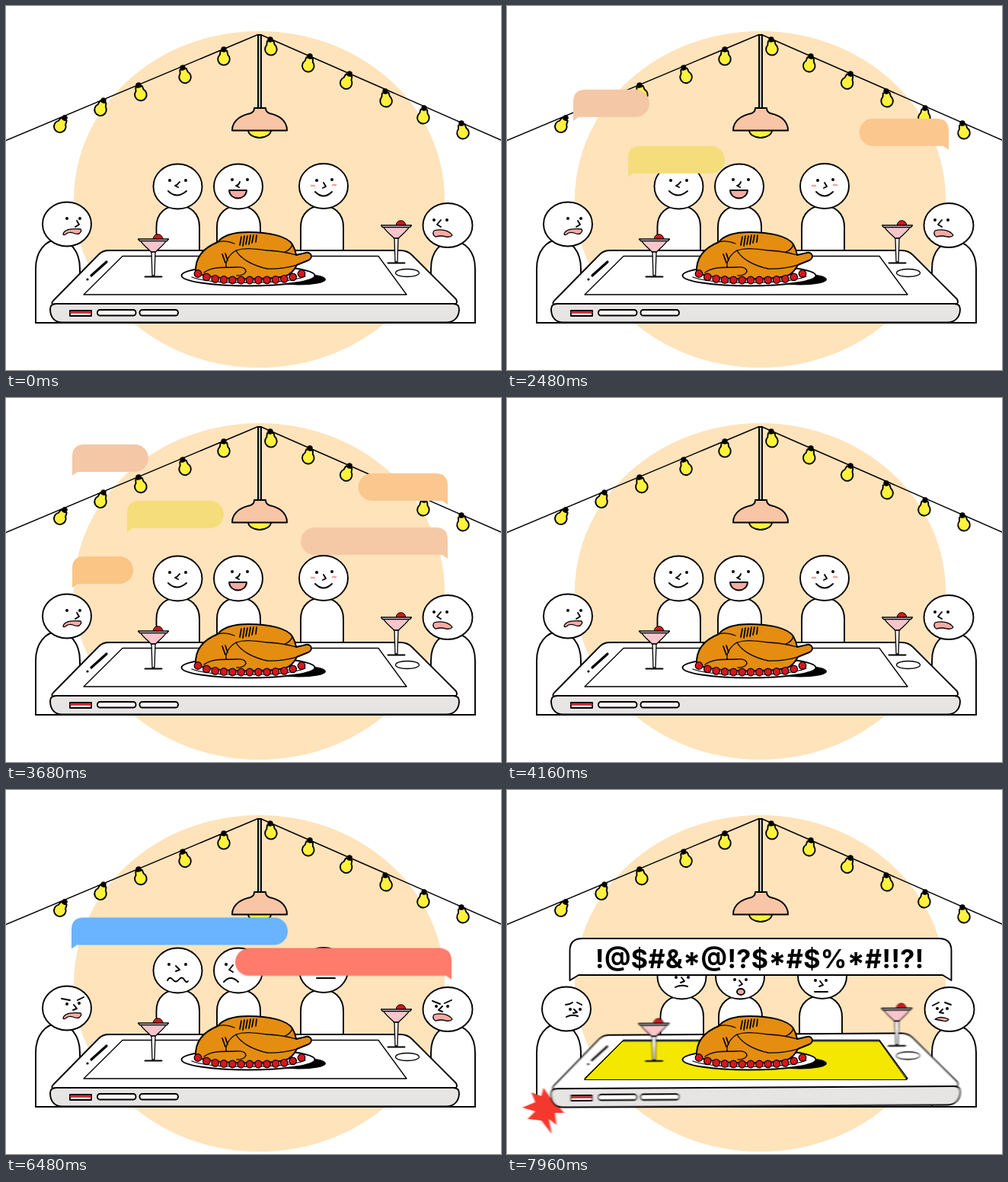
Animation of 650x478 px, one loop 8000 ms. Source, as an HTML page:

```html
<!DOCTYPE html>
<html lang="en">
<head>
<meta charset="utf-8">
<title>Dinner on a phone</title>
<style>
html, body { margin: 0; width: 100%; height: 100%; overflow: hidden; background: #fff; }
svg { display: block; width: 100vw; height: 100vh; }
.ink { stroke: #000; stroke-width: 1.9; stroke-linejoin: round; stroke-linecap: round; fill: none; }
.w { fill: #fff; }
.pink { fill: #f8aaa4; }
.eyes { stroke-width: 4; }
.thin { stroke-width: 1.3; }

/* 1% of the loop is 80 ms */
.s, .chat, .row, .quarrel, .shout, .jolt, .slam, .soft, .burst, .type {
  animation: 8s linear infinite;
}
.s, .jolt, .slam, .soft, .burst, .type { animation-timing-function: step-end; }
.a { animation-name: calm; }
.b { animation-name: stare; }
.bc { animation-name: glare; }
.cd { animation-name: worry; }
.bd { animation-name: anger; }
.d { animation-name: argue; }
.e { animation-name: shock; }
.flash { animation-name: flash; }
@keyframes calm { 0% { opacity: 1 } 57.5%, 100% { opacity: 0 } }
@keyframes stare { 0% { opacity: 0 } 57.5% { opacity: 1 } 67.5%, 100% { opacity: 0 } }
@keyframes glare { 0% { opacity: 0 } 57.5% { opacity: 1 } 81%, 100% { opacity: 0 } }
@keyframes worry { 0% { opacity: 0 } 67.5% { opacity: 1 } 97%, 100% { opacity: 0 } }
@keyframes anger { 0% { opacity: 0 } 57.5% { opacity: 1 } 97%, 100% { opacity: 0 } }
@keyframes argue { 0% { opacity: 0 } 81% { opacity: 1 } 97%, 100% { opacity: 0 } }
@keyframes shock { 0% { opacity: 0 } 97%, 100% { opacity: 1 } }
@keyframes flash { 0% { opacity: 0 } 98%, 100% { opacity: 1 } }

.chat { animation-name: chat, chatOut; }
.quarrel { animation-name: quarrel, quarrelOut; }
.chat, .quarrel { animation-timing-function: ease-in-out, linear; }
@keyframes chat {
  0%, 14.25% { transform: translateY(0) }
  18%, 21.25% { transform: translateY(-39px) }
  25%, 28.75% { transform: translateY(-74px) }
  32.5%, 36.25% { transform: translateY(-110px) }
  40%, 46% { transform: translateY(-147px) }
  52%, 100% { transform: translateY(-206px) }
}
@keyframes chatOut { 0%, 46.5% { opacity: 1 } 52%, 100% { opacity: 0 } }
@keyframes quarrel {
  0%, 63.3% { transform: translateY(0) }
  67.05%, 100% { transform: translateY(-40.5px) }
}
@keyframes quarrelOut { 0%, 50% { opacity: 0 } 50.1%, 85% { opacity: 1 } 87%, 100% { opacity: 0 } }
.row { animation-name: row; }
@keyframes row {
  0% { opacity: 0; transform: translateY(5px) }
  1.75%, 45% { opacity: 1; transform: translateY(0) }
  45.1%, 100% { opacity: 0; transform: translateY(5px) }
}
.shout { animation-name: shout; }
@keyframes shout { 0%, 88.5% { opacity: 0 } 90.5%, 100% { opacity: 1 } }
.type { animation-name: type; }
@keyframes type { 0% { fill: #000 } 9%, 100% { fill: transparent } }

.jolt { animation-name: jolt; }
@keyframes jolt {
  0% { transform: none }
  97% { transform: translate(0, -2px) }
  97.5% { transform: translate(0, -4px) }
  98% { transform: translate(calc(var(--x) * -.5), 3px) }
  98.5% { transform: translate(var(--x), var(--y)) }
  99% { transform: translate(calc(var(--x) * .4), 4px) }
  99.5%, 100% { transform: translate(var(--x), var(--y)) }
}
.slam { animation-name: slam; transform-origin: 590px 415px; }
@keyframes slam {
  0% { transform: none }
  97% { transform: rotate(.4deg) }
  97.5% { transform: rotate(.8deg) }
  98% { transform: rotate(-.3deg) }
  98.5% { transform: translate(2px, -2px) }
  99% { transform: translate(-1px, 2px) }
  99.5%, 100% { transform: translate(0, -2px) rotate(-.35deg) }
}
.soft { animation-name: soft; }
@keyframes soft { 0% { filter: none } 97.5%, 100% { filter: url(#smear) } }
.burst { animation-name: burst; transform-origin: 60px 408px; }
@keyframes burst {
  0% { opacity: 0; transform: scale(.5) }
  98% { opacity: 1; transform: scale(.6) }
  98.5% { opacity: 1; transform: scale(.85) }
  99% { opacity: 1; transform: scale(.95) }
  99.5%, 100% { opacity: 1; transform: none }
}
text { font: 700 34px Inter, "Open Sans", sans-serif; font-feature-settings: "case"; letter-spacing: .4px; }
</style>
</head>
<body>
<svg viewBox="0 0 650 478" preserveAspectRatio="none">
<defs>
  <filter id="smear" x="-5%" y="-10%" width="110%" height="120%"><feGaussianBlur stdDeviation="1.3 .7"/></filter>
  <g id="bulb">
    <path class="ink" style="fill:#fff23c" d="M-4.300 2L-5.200 7A7.800 7.800 0 1 0 5.200 7L4.300 2Z"/>
    <circle r="3.700"/>
  </g>
  <g id="glass">
    <circle class="ink" style="fill:#d8141c;stroke-width:1" cx="6" cy="0" r="6.300"/>
    <path class="ink thin" style="fill:#f9c5cc" d="M-17 2C-13 9 -6 13 -3 17H3C6 13 13 9 17 2Z"/>
    <path class="ink w thin" d="M-20 0H20L18 2.500H-18ZM-2.500 17L-1.500 48H1.500L2.500 17Z"/>
    <path class="ink" d="M-11 49.500H11"/>
  </g>
</defs>

<ellipse cx="332.500" cy="254" rx="243.500" ry="221" fill="#ffe3bb"/>

<g class="ink">
  <path style="stroke-width:1.500" d="M0 176.500 331 37.500M334 37.500 650 176"/>
  <path style="fill:#bbb" d="M331 38H335V135H331Z"/>
  <path style="fill:#fff23c" d="M318 163A15 10 0 0 0 348 163Z"/>
  <path style="fill:#f8c5a5" d="M297 163.500C297 149 311 143 321 141Q326 139 326 134H341Q341 139 346 141C356 143 369 149 369 163.500Z"/>
</g>
<g id="bulbs"></g>

<g class="ink">
  <g class="jolt" style="--x:4px;--y:8px">
    <path class="w" d="M197.500 335V290C197.500 272 210 262 226 262S254 272 254 290V335"/>
    <ellipse class="w" cx="225.500" cy="237" rx="32" ry="29.500"/>
    <g class="s a"><path class="eyes" d="M215 229h.01M236 229h.01"/><path d="M228 231Q225 235 222 236L226 238M213 243Q224 254 237 243"/></g>
    <g class="s b"><path class="eyes" d="M208 230h.01M227 230h.01"/><path d="M215 230 211 236 215 238M204 247Q207 242 210 246T217 247T224 247T229 249"/></g>
    <g class="s cd"><path class="eyes" d="M214 229h.01M236 229h.01"/><path d="M223 231 228 236 223 238M212 250Q215 244 219 249T227 249T234 249T239 251"/></g>
    <g class="s e"><path class="eyes" d="M218 238h.01M234 238h.01"/><path d="M225 238 229 243 224 245M217 251Q225 247 233 250"/></g>
  </g>
  <g class="jolt" style="--x:1px;--y:8px">
    <path class="w" d="M277 335V290C277 272 290 262 305.500 262S334 272 334 290V335"/>
    <ellipse class="w" cx="305" cy="237" rx="32" ry="29.500"/>
    <g class="s a"><path class="eyes" d="M297 228h.01M317 228h.01"/><path d="M307 231Q306 235 302 236L306 238"/><path class="pink" d="M293 242H316C315 256 294 256 293 242Z"/></g>
    <g class="s bd"><path class="eyes" d="M289 229h.01M307 229h.01"/><path d="M298 230 293 236 298 239M286 252Q295 242 305 252"/></g>
    <g class="s e"><path class="eyes" d="M298 241h.01M313 241h.01"/><path d="M304 242 308 247 304 249"/><ellipse class="pink" cx="306" cy="257" rx="5" ry="4"/></g>
  </g>
  <g class="jolt" style="--x:-3px;--y:8px">
    <path class="w" d="M387 335V290C387 272 400 262 415 262S443 272 443 290V335"/>
    <ellipse class="w" cx="417" cy="236.500" rx="32" ry="29.500"/>
    <g class="s a"><path class="eyes" d="M408 229h.01M428 228h.01"/><path d="M417 232 420 237 416 239M406 244Q417 255 428 244"/><path style="stroke:#f9a49c;stroke-width:2.500" d="M401 236H405M429 235H433"/></g>
    <g class="s b"><path class="eyes" d="M397 229h.01M411 229h.01"/><path d="M404 230 400 235 404 238M393 247H415"/><path style="stroke-linecap:butt" d="M431.500 208V231M436.800 208V231M442 208V232M447.300 208V232"/></g>
    <g class="s cd"><path class="eyes" d="M410 229h.01M429 229h.01"/><path d="M418 231 422 236 418 239M408 247H432"/></g>
    <g class="s e"><path class="eyes" d="M408 242h.01M422 242h.01"/><path d="M414 243 418 248 413 250M407 257H424"/></g>
  </g>

  <path d="M39 416H616"/>
  <path class="w" d="M39 416V345C39 322 52 307 68 307S97 322 97 345V416Z"/>
  <path class="w" d="M558 416V345C558 322 571 309 587 309S616 322 616 345V416Z"/>
  <g class="jolt" style="--x:-2px;--y:1px">
    <ellipse class="w" cx="80" cy="286.500" rx="32" ry="29"/>
    <g class="s a"><path class="eyes" d="M80 279h.01M97 279h.01"/><path d="M93 282 96 287 91 290"/></g>
    <g class="s bc"><path d="M77 294Q86 296 99 292"/></g>
    <g class="s bd"><path class="eyes" d="M80 281h.01M96 280h.01"/><path d="M73 274 84 276M94 276 102 272M89 282 93 287 88 289"/></g>
    <g class="s e"><path class="eyes" d="M85 287h.01M98 287h.01"/><path d="M79 281Q84 281 88 278M94 278 100 281M90 287 94 291 89 292M80 297Q87 293 95 296"/></g>
    <g id="growl"><path class="pink thin" d="M75 300C76 293 86 292 98 293Q100 296 96 299Q92 300 88 298Q82 296 78 300Q76 301 75 300Z"/></g>
  </g>
  <g class="jolt" style="--x:1px;--y:0px">
    <ellipse class="w" cx="580" cy="288" rx="32.500" ry="29"/>
    <g class="s a"><path class="eyes" d="M562 281h.01M579 281h.01"/><path d="M571 281 566 287 571 290"/></g>
    <g class="s bc"><path d="M561 298Q569 296 581 292"/></g>
    <g class="s bd"><path class="eyes" d="M565 284h.01M580 284h.01"/><path d="M560 277 570 281M576 280 585 276M573 284 568 289 573 291"/></g>
    <g class="s e"><path class="eyes" d="M564 287h.01M577 287h.01"/><path d="M558 283 566 279M574 279 582 282M571 288 567 292 572 293"/><path class="pink thin" d="M561 301Q568 296 579 301Q577 305 571 303Q565 302 561 301Z"/></g>
    <g id="growl2"><path class="pink thin" d="M562 295C572 292 582 295 586 301Q584 304 578 303Q571 301 564 303Q559 300 562 295Z"/></g>
  </g>
</g>

<path class="burst soft" style="animation-name:burst,soft" fill="#f5392f" d="M20 417 37 410 32 397 45 402 48 391 57 404 75 408 66 413 75 424 63 424 65 440 55 432 59 452 45 434 27 432 37 422Z"/>

<g class="slam"><g class="soft ink">
  <path class="w" d="M62 387 122 326Q127 321 135 321H518Q527 321 533 327L591 385Q594 391 588 392H64Q58 392 62 387Z"/>
  <path style="fill:#e7e4e4" d="M58 398Q58 391 66 391H587Q595 391 595 398C595 409 588 415.500 578 415.500H74C64 415.500 58 409 58 398Z"/>
  <path style="stroke-width:3.200" d="M112 354 132 336M107 359h.01"/>
  <ellipse class="w thin" cx="527" cy="350.500" rx="15.500" ry="5"/>
  <path class="w" d="M84 400H112V407H84Z"/>
  <path style="stroke:#c8141c;stroke-width:2.600" d="M85 402.500H111"/>
  <rect class="w" x="120" y="399" width="50.500" height="7.500" rx="3.500"/>
  <rect class="w" x="175.500" y="399" width="50.500" height="7.500" rx="3.500"/>
</g></g>
<g class="ink">
  <path class="w thin" d="M153 328.500H489L526 379H102Z"/>
  <path class="s flash" style="fill:#f5e800;stroke-width:1" d="M152 330H489L525 380.500H102Z"/>
</g>
<g class="slam"><g class="soft">
  <use href="#glass" x="193.500" y="306"/>
  <use href="#glass" x="512.500" y="288"/>
</g></g>

<g class="ink">
  <ellipse style="fill:#000" cx="385" cy="359" rx="34" ry="6.500"/>
  <ellipse class="w" cx="318" cy="354" rx="87.500" ry="13.500"/>
  <path class="thin" d="M244 356C270 366 366 366 393 355"/>
  <path style="fill:#e48d10" d="M249 350C248 331 258 318 278 310C286 300 300 297 318 297C345 297 369 302 376 313Q380 320 381 327L394 324Q399 323 401 328Q401 332 397 334L382 340Q376 352 366 355C340 360 270 360 249 350Z"/>
  <path class="thin" d="M278 310Q288 307 300 312M302 321C316 316 331 320 344 321Q364 322 381 327M302 321C308 332 324 341 343 345Q361 346 382 340M302 321C292 327 288 336 289 343M260 350C272 341 288 344 302 343Q315 342 315 349Q312 354 303 354M376 313Q374 320 366 323"/>
  <path style="stroke-width:1.700" d="M309 303 307 314M313 302 311 315M317 302 315 313M321 301 319 313M325 301 323 311M329 301 328 310M284 326 288 337M288 325 291 334"/>
  <g id="berries" style="fill:#d9151d;stroke-width:1.200"></g>
</g>

<g class="chat" id="chat"></g>
<g class="quarrel" id="quarrel"></g>
<g class="shout">
  <path class="ink w" d="M82.500 250V211Q82.500 195 99 195H567Q583.500 195 583.500 211V250L572 243H94Z"/>
  <text x="116" y="234" id="curse"></text>
</g>
</svg>
<script>
const el = id => document.getElementById(id);
const fill = (id, list, draw) => { el(id).innerHTML += list.map(draw).join(""); };
const from = ms => `animation-delay:${ms - 8000}ms`;

// growling mouths show while calm and again while arguing
for (const id of ["growl", "growl2"]) {
  const mouth = el(id).innerHTML;
  el(id).innerHTML = ["a", "d"].map(c => `<g class="s ${c}">${mouth}</g>`).join("");
}

// hanging point and tilt of each bulb
fill("bulbs", [
  [77, 147, 29], [128, 124, 18], [174, 104, -13], [232, 81, -14], [286, 57, 0],
  [347, 44, -4], [399, 66, 10], [451, 89, 20], [498, 112, -5], [549, 134, 5], [598, 154, -9]
], ([x, y, r]) => `<use href="#bulb" transform="translate(${x} ${y}) rotate(${r})"/>`);

fill("berries", [...Array(13).keys()], i => {
  const u = i / 6 - 1;
  return `<circle cx="${320 + 68 * u}" cy="${360 - 8.5 * u ** 4}" r="4.8"/>`;
});

// negative width puts the tail on the right
const bubble = ([x, y, w, color, start]) => {
  const n = Math.abs(w);
  return `<g class="row" style="${from(start)}"><path fill="${color}"
    transform="translate(${x} ${y}) scale(${Math.sign(w)} 1)"
    d="M0 16Q0 0 16 0H${n - 18}a18 18 0 0 1 0 36H7L0 41Z"/></g>`;
};
fill("chat", [
  [87, 208, 100, "#f4c7a6", 740],
  [580, 246, -117.5, "#fbc78f", 1320],
  [159, 282, 127, "#f6dd7b", 1900],
  [580, 317, -193, "#f6c9a6", 2500],
  [87, 355, 80, "#fbc585", 3100]
], bubble);
fill("quarrel", [
  [86, 208, 284, "#69b3ff", 4740],
  [585, 248.5, -284, "#ff7b6b", 5280]
], bubble);

fill("curse", ["!@$#", "&amp;*@!", "?$*#", "$%*#", "!!?!"], (part, i) =>
  `<tspan class="type" style="${from(7320 + 80 * i)}">${part}</tspan>`);
</script>
</body>
</html>
```
